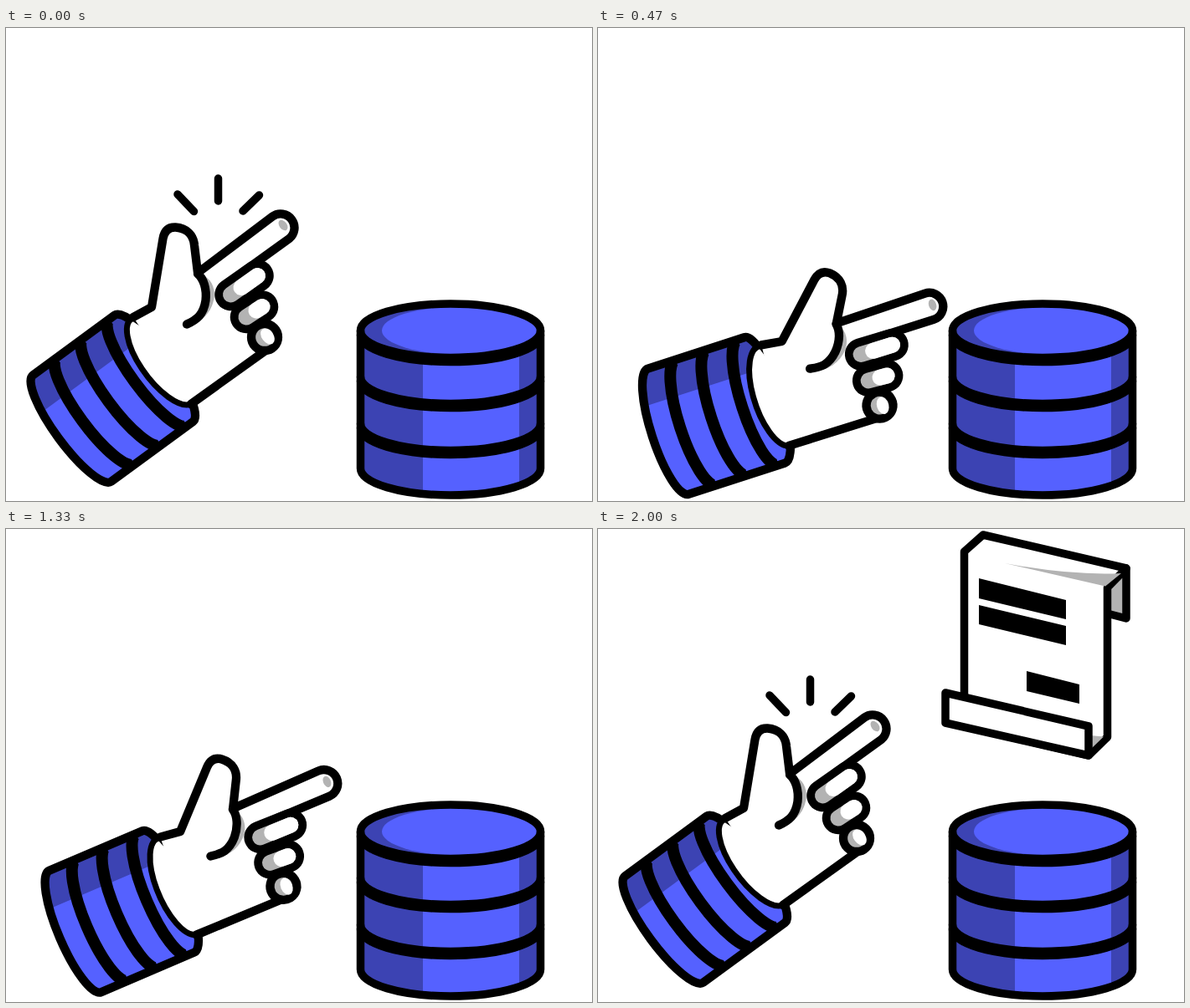
These frames come from a looping animation (700 px wide and 566 px high, 3.14 s). An HTML page:

```html
<!DOCTYPE html>
<html lang="en">
<head>
<meta charset="utf-8">
<title>Snap a document out of the database</title>
<style>
  html, body { margin: 0; width: 100%; height: 100%; overflow: hidden; background: #fff; }
  svg { display: block; width: 700px; height: 566px; }
  .ink { stroke: #000; stroke-width: 9.5; stroke-linejoin: round; stroke-linecap: round; }
  #hand .ink { stroke-width: 10.3; }
  #hand .thin { stroke-width: 7; }
  .band { stroke: #000; stroke-width: 14; fill: none; }
  .line { fill: none; }
  .blue { fill: #5561ff; }
  .navy { fill: #3c43b3; }
  .white { fill: #fff; }
  .grey { fill: #b3b3b3; }
  .finger path { fill: none; stroke-linecap: round; stroke-width: 19; }
  .finger path:nth-child(1) { stroke: #000; stroke-width: 38.5; }
  .finger path:nth-child(2) { stroke: #b3b3b3; }
  .finger path:nth-child(3) { stroke: #fff; }
</style>
</head>
<body>
<svg viewBox="0 0 700 566">
  <defs>
    <clipPath id="sleeveClip"><path d="M0,-79H121A20 79 0 0 1 121,79H0A20 79 0 0 1 0,-79Z"/></clipPath>
    <clipPath id="drumClip"><path d="M423.5,362V527A107.5 32 0 0 0 638.5,527V362Z"/></clipPath>
    <path id="rim" d="M423.5,-2.5A107.5 32 0 0 0 638.5,-2.5M423.5,2.5A107.5 32 0 0 0 638.5,2.5"/>
  </defs>

  <g id="database">
    <g clip-path="url(#drumClip)">
      <rect class="navy" x="419" y="362" width="224" height="204"/>
      <rect class="blue" x="498" y="362" width="115" height="204"/>
    </g>
    <ellipse class="navy" cx="531" cy="362" rx="107.5" ry="32"/>
    <ellipse class="blue" cx="542" cy="362" rx="93" ry="28.5"/>
    <g class="ink line">
      <use href="#rim" y="365"/>
      <use href="#rim" y="420"/>
      <use href="#rim" y="476"/>
      <path d="M423.5,362V527A107.5 32 0 0 0 638.5,527V362A107.5 32 0 0 0 423.5,362"/>
    </g>
  </g>

  <g id="paper">
    <path class="ink grey" d="M608,70L631,47V107L608,101Z"/>
    <path class="ink white" d="M437.5,27L460,7L631,47L608.5,70V249L586,271L437.5,236Z"/>
    <path class="grey" d="M486,41Q566,56 625,53L606,68.5Z"/>
    <path class="grey" d="M588,247L604,248.5L588,264Z"/>
    <path class="ink white" d="M415,196L586,236V271L415,232Z"/>
    <path d="M455,59L559,85V108L455,83ZM455,91L559,116V139L455,114ZM512,170L575,186V209L512,194Z"/>
  </g>

  <g id="hand">
    <g transform="translate(79 479) rotate(-36.3)">
      <g clip-path="url(#sleeveClip)">
        <rect class="blue" x="-25" y="-80" width="170" height="160"/>
        <rect class="navy" x="-25" y="-80" width="170" height="43"/>
        <path class="band" d="M35,79A20 79 0 0 1 35,-79M74,79A20 79 0 0 1 74,-79M113,79A20 79 0 0 1 113,-79"/>
      </g>
      <path class="ink line" d="M0,-79H121A20 79 0 0 1 121,79H0A20 79 0 0 1 0,-79Z"/>
    </g>
    <path class="ink thin white" d="M221,450A25 62 -36.3 0 1 152,347L200,380"/>
    <path class="ink white" d="M152,346L174,334L187.5,252Q190,238 202.5,238.5C216,239.5 224,248 225,260L229,293L318.2,225.7A16.5 16.5 0 0 1 337.8,252.3L283,292L280,312L296,340L309,370L310,386L221,450"/>
    <path class="grey" d="M234,295C256,305 252,336 232,350L216,355Z"/>
    <path class="white" d="M229,300C236,305 242,312 240,326C237,343 228,350 216,355L200,330Z"/>
    <path class="ink line" d="M229,294C236,300 240,312 238.5,326C236,343 228,349 216,354.5"/>
    <ellipse class="grey" cx="331" cy="236" rx="4.5" ry="7" transform="rotate(-36 331 236)"/>
    <g class="finger">
      <path d="M287,346L306,333.5"/><path d="M287,346L306,333.5"/><path d="M299,338L306,333.5"/>
    </g>
    <g class="finger">
      <path d="M268.5,319L300.5,296.5"/><path d="M268.5,319L300.5,296.5"/><path d="M281,310.5L300.5,296.5"/>
    </g>
    <circle class="ink grey" cx="309" cy="370" r="16"/>
    <ellipse class="white" cx="312.5" cy="369" rx="7" ry="10.5" transform="rotate(-36 312.5 369)"/>
  </g>

  <g id="sparks" class="ink line">
    <path pathLength="1" d="M224.5,219.5L205,199"/>
    <path pathLength="1" d="M253.5,207V180"/>
    <path pathLength="1" d="M283,219L302.5,200"/>
  </g>
</svg>
<script>
  const LOOP = 3140, STEP = 1000 / 15;
  const SWING = 21.9, RISE = 55;
  const [hand, paper, sparks] = ['hand', 'paper', 'sparks'].map(id => document.getElementById(id));

  const clamp = x => Math.min(1, Math.max(0, x));
  const ease = x => x * x * (3 - 2 * x);

  function pose(n) {
    const down = ease(clamp(n / 9.4));
    const up = ease(clamp((n - 16) / 11) ** 0.83);
    hand.setAttribute('transform', `rotate(${SWING * (down - up)} 70 496)`);

    // The sheet brightens while it rises and shows only past half strength.
    const rest = 1 - ease(clamp((n - 20) / 7));
    const light = 1 - 1.15 * rest;
    paper.style.display = light < 0.5 ? 'none' : '';
    paper.style.filter = light < 1 ? `brightness(${light})` : 'none';
    paper.setAttribute('transform', `translate(0 ${RISE * rest})`);

    const grow = n < 1 ? 1 : clamp((n - 27) / 3);
    sparks.style.display = grow ? '' : 'none';
    sparks.style.strokeDasharray = grow < 1 ? `${grow} 2` : 'none';
  }

  const start = performance.now();
  function tick() {
    const t = (performance.now() - start) % LOOP;
    pose(Math.floor((t + 4) / STEP));
    requestAnimationFrame(tick);
  }
  tick();
</script>
</body>
</html>
```
